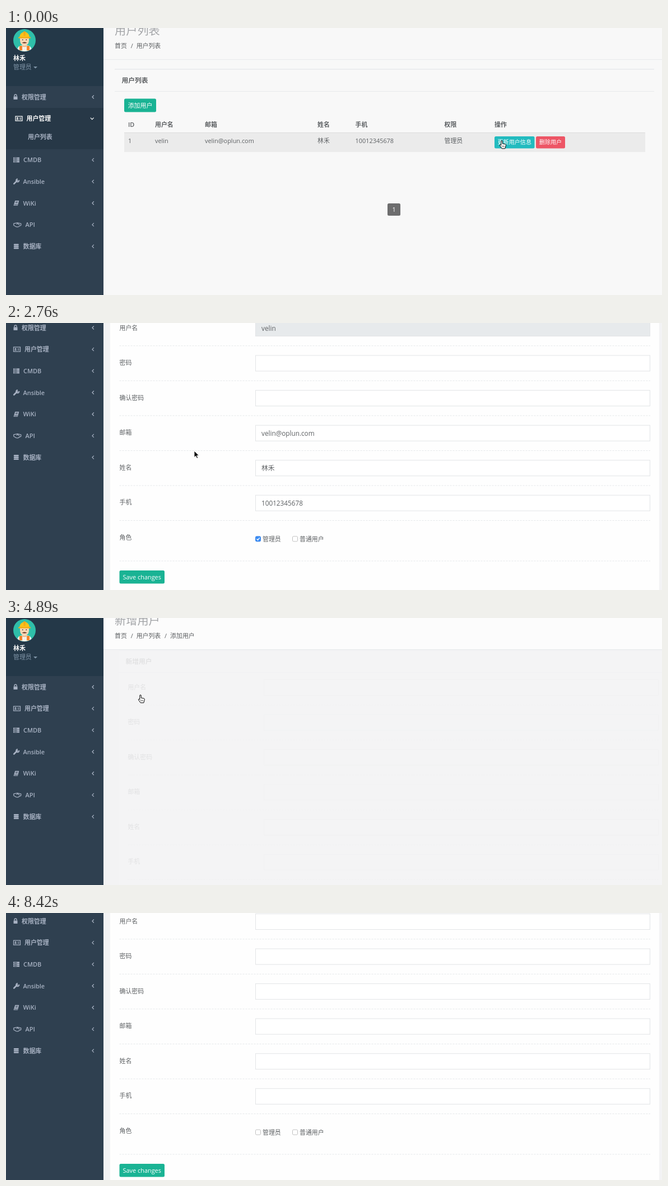
An HTML page that plays this animation: 1171 px wide and 478 px high, repeating every 9.26 s.

```html
<!DOCTYPE html>
<html lang="zh-CN">
<head>
<meta charset="utf-8">
<title>用户列表</title>
<style>
html, body { margin: 0; width: 100%; height: 100%; overflow: hidden; background: #f3f3f4; }
svg { display: block; width: 1171px; height: 478px; }
text { font-family: "Open Sans", "Noto Sans CJK SC", "Noto Sans CJK", sans-serif; white-space: pre; }
</style>
</head>
<body>
<svg id="stage" viewBox="0 0 1171 478" xmlns="http://www.w3.org/2000/svg"></svg>
<script>
const LOOP = 9260;
const USER = 'velin', MAIL = 'velin@oplun.com', PHONE = '10012345678', NAME = '林禾';
const INK = '#5d6063', LINE = '#e7eaec', TEAL = '#1ab394', GREY = '#a7b1c2', BED = '#2f4050';
const EM = 10.92, BIG = 11.76, SMALL = 10.08;

// ---------- drawing helpers ----------
const rect = (x, y, w, h, fill, more = '') =>
  `<rect x="${x}" y="${y}" width="${w}" height="${h}" fill="${fill}" ${more}/>`;
const circle = (x, y, r, fill) => `<circle cx="${x}" cy="${y}" r="${r}" fill="${fill}"/>`;
const area = (d, fill) => `<path d="${d}" fill="${fill}"/>`;
const line = (d, color, width = 1, more = '') =>
  `<path d="${d}" fill="none" stroke="${color}" stroke-width="${width}" ${more}/>`;
const group = (content, more = '') => `<g ${more}>${content}</g>`;
const at = (x, y) => `transform="translate(${x} ${y})"`;
const times = (n, f) => Array.from({ length: n }, (_, i) => f(i)).join('');
// y is the optical middle of the line
const text = (x, y, s, { size = EM, fill = INK, weight = 400, anchor = 'start' } = {}) =>
  `<text x="${x}" y="${y + size * 0.37}" font-size="${size}" fill="${fill}" font-weight="${weight}" text-anchor="${anchor}">${s}</text>`;
const button = (x, y, w, h, fill, label, size = EM, more = '') =>
  rect(x, y, w, h, fill, `rx="2.5" ${more}`) +
  text(x + w / 2, y + h / 2, label, { size, fill: '#fff', weight: 500, anchor: 'middle' });

// ---------- sidebar ----------
const icons = {
  lock: () => rect(-3.5, -1, 7, 5.5, GREY) + line('M-2 -1v-1.5a2 2 0 0 1 4 0V-1', GREY, 1.4),
  card: c => line('M-6 -4h12v8h-12z', c, 1.2) + circle(-2.5, -1, 1.4, c) + rect(-4.2, .6, 3.4, 1.6, c) +
    times(2, i => rect(1, -1.6 + 2.2 * i, 3.4, 1, c)),
  server: () => times(3, i => rect(-5.5, -4.5 + 3.2 * i, 11, 2.6, GREY) + rect(-4, -3.7 + 3.2 * i, 5, 1, BED)),
  wrench: () => line('M-4 4L2 -2', GREY, 2.6, 'stroke-linecap="round"') + line('M5 -2.5a2.6 2.6 0 1 1 -2.5 -2', GREY, 2),
  book: () => area('M-2 -4.5h7l-2.4 9h-7.4z', GREY) + times(2, i => rect(-1 - i / 2, -2.8 + 1.8 * i, 3.8, .9, BED)) +
    rect(-3.5, 2.4, 6, .9, BED),
  hands: () => line('M-6.5 -2l4.500 -1 2 -.5 6.500 1.500v3l-5.500 3 -3 -.3 -4.500 -2.700z', GREY, 1.2) + line('M-1.500 -.5l2 -2 3.500 3', GREY, 1.2),
  data: () => times(3, i => rect(-4.5, -4.5 + 3.2 * i, 9, 2.6, GREY, 'rx="1.2"'))
};
// icon, icon width, label
const menu = [['lock', 8, '权限管理'], ['card', 13, '用户管理'], ['server', 11, 'CMDB'], ['wrench', 10.5, 'Ansible'],
  ['book', 10.5, 'WiKi'], ['hands', 14.5, 'API'], ['data', 10.5, '数据库']];

const avatar = () => group(
  circle(0, 0, 20, '#2fbfa9') +
  area('M-12.5 15.6Q-11 9 -4 9h8q7 0 8.5 6.6A20 20 0 0 1 -12.5 15.6z', '#f4f1ea') +
  times(2, i => rect(-9 + 13 * i, 10, 5, 8, '#f0842c')) +
  rect(-3.5, 6, 7, 6, '#eebd94') +
  area('M-8 -5h16v6q-1 8 -8 9 -7 -1 -8 -9z', '#fad7b4') +
  area('M-4.5 4.600q4.500 -3 9 0 -4.500 1.800 -9 0z', '#6b3f2c') +
  times(2, i => circle(-3.3 + 6.6 * i, -.8, .9, '#333')) +
  area('M-9 -5a9 10 0 0 1 18 0z', '#fcc21b') +
  rect(-1.7, -16, 3.4, 8, '#f5a81c') +
  rect(-11, -6, 22, 2.6, '#f3ab19', 'rx="1.3"'), at(33, 22));

function sidebar(open) {
  let s = rect(0, -60, 174, 164, '#243848') + avatar() +
    text(13, 53.5, NAME, { fill: '#fff', weight: 700 }) +
    text(13, 69.5, '管理员', { fill: '#8095a8' }) + area('M49 69h7l-3.5 3.5z', '#8095a8');
  if (open) s += rect(0, 143, 174, 74, '#273847') + text(39, 195, '用户列表', { fill: GREY, weight: 600 });
  menu.forEach(([icon, w, label], i) => {
    const on = open && i === 1, c = on ? '#fff' : GREY, x = on ? 16.5 : 13;
    const y = 123.5 + 38.68 * i + (open && i > 1 ? 35.3 : 0);
    s += group(icons[icon](c), at(x + w / 2, y)) + text(x + w + 7, y, label, { fill: c, weight: 600 }) +
      line(on ? `M150.8 ${y - 1.5}l2.9 3 2.9 -3` : `M156.8 ${y - 3}l-2.9 3 2.9 3`, c, 1.2);
  });
  return s;
}

// ---------- pages ----------
function heading(title, crumbs) {
  let x = 194, s = text(x, 4.5, title, { size: 20.2, weight: 100, fill: '#a3a5a8' });
  crumbs.forEach((c, i) => {
    if (i) s += text(x - 8, 31.5, '/', { anchor: 'middle' });
    s += text(x, 31.5, c);
    x += c.length * EM + 16.8;
  });
  return s;
}

const panelHead = (x, y, w, title) => rect(x, y, w, 1.5, LINE) +
  text(x + 12.5, y + 21, title, { size: BIG, weight: 600 }) + rect(x, y + 40, w, 1, LINE);

function list() {
  const cols = [218, 266, 355, 556, 623.5, 782.5, 872];
  const heads = ['ID', '用户名', '邮箱', '姓名', '手机', '权限', '操作'];
  const row = ['1', USER, MAIL, NAME, PHONE, '管理员'];
  return rect(150, 56, 1040, 600, '#f8f8f8') + panelHead(194, 73, 963, '用户列表') +
    button(211, 126.5, 57, 24, TEAL, '添加用户') +
    heads.map((h, i) => text(cols[i], 173, h, { weight: 600 })).join('') +
    rect(211, 187.5, 930, 34.5, '#f5f5f5', 'id="row"') + rect(211, 187, 930, 1, '#dcdcdc') +
    row.map((v, i) => text(cols[i], 202, v)).join('') +
    button(872, 194, 71.5, 21.5, '#23c6c8', '更新用户信息', SMALL, 'id="edit"') +
    button(946, 194, 52, 21.5, '#ed5565', '删除用户', SMALL) +
    button(681, 314, 23, 22, '#6d6d6e', '1');
}

const checkbox = (x, y, label, on) =>
  rect(x + .5, y - 4.5, 9, 9, on ? '#3b8df5' : '#fff', `rx="1.8" stroke="${on ? '#3580e6' : '#b9b9b9'}" stroke-width=".9"`) +
  (on ? line(`M${x + 2.6} ${y}l1.9 2.2 3.2 -4.4`, '#fff', 1.4) : '') + text(x + 13, y, label);

function form(title, values) {
  const labels = ['用户名', '密码', '确认密码', '邮箱', '姓名', '手机', '角色'];
  const dash = y => line(`M202.5 ${y}H1150`, '#e4e7e9', 1, 'stroke-dasharray="3 2"');
  let s = rect(186, 57, 980, 700, '#fefefe') + panelHead(186, 57, 980, title);
  labels.forEach((label, i) => {
    const y = 110.5 + 62.55 * i;
    s += text(202.5, y + 13, label);
    if (i < 6) s += rect(445.5, y, 704, 28, values && !i ? '#e7eaec' : '#fff', 'stroke="#e2e4e6"') +
      text(456, y + 14, values ? values[i] : '', { size: BIG }) + dash(y + 45.3);
  });
  return s + checkbox(445, 501.5, '管理员', !!values) + checkbox(511, 501.5, '普通用户', false) +
    dash(541) + button(202.5, 558, 80.5, 23.5, TEAL, 'Save changes');
}

const pointers = {
  arrow: `<path d="M0 0v11.500l2.700 -2.500 2 4.300 2 -.9 -2 -4.100h3.700z" stroke="#fff" stroke-width=".9"/>`,
  beam: line('M-2.500 -6q2.500 0 2.500 1.500v9q0 1.500 2.500 1.500M2.500 -6q-2.500 0 -2.500 1.500v9q0 1.500 -2.500 1.500M-1.500 1h3', '#222'),
  hand: `<path d="M-1.200 1q0 -1.300 1.200 -1.300t1.200 1.300v4l5 1q1.300 .4 1.200 1.800l-1.600 6h-5.600l-3.500 -5q-.9 -1.600 .6 -1.800l1.500 1z" fill="#fff" stroke="#000"/>` +
    times(3, i => rect(.2 + 1.8 * i, 8.5, .6, 2.6, '#000'))
};

const views = {
  list: [list(), heading('用户列表', ['首页', '用户列表'])],
  update: [form('更新用户信息', [USER, '', '', MAIL, NAME, PHONE]), heading('更新用户', ['首页', '用户列表', '更新用户'])],
  add: [form('新增用户'), heading('新增用户', ['首页', '用户列表', '添加用户'])]
};
const names = Object.keys(views);

const stage = document.getElementById('stage');
stage.innerHTML =
  rect(174, 0, 997, 478, '#f3f3f4') +
  group(
    names.map(n => group(views[n][0], `id="${n}"`)).join('') +
    rect(174, -60, 997, 116, '#fcfcfc', 'id="top"') + rect(174, 56, 997, 1, LINE) +
    names.map(n => group(views[n][1], `id="${n}Head"`)).join(''), 'id="page"') +
  rect(0, 0, 174, 478, BED) +
  group(group(sidebar(false), 'id="shut"') + group(sidebar(true), 'id="open"'), 'id="side"') +
  Object.keys(pointers).map(k => group(pointers[k], `id="${k}"`)).join('');

const el = {};
stage.querySelectorAll('[id]').forEach(n => el[n.id] = n);
const show = (id, on) => el[id].setAttribute('display', on ? 'inline' : 'none');
const fill = (id, c) => el[id].setAttribute('fill', c);
const move = (id, x, y) => el[id].setAttribute('transform', `translate(${x.toFixed(2)} ${y.toFixed(2)})`);

// ---------- motion ----------
const CLICK = 470, BOTTOM = -109;
const visits = [[-2000, 'list'], [CLICK, 'update'], [3905, 'list'], [4780, 'add']];
// start, resting place, overshoot
const flicks = [[0, 0, 0], [1240, BOTTOM, -10], [1900, 0, 5], [2460, BOTTOM, -6], [2950, 0, 5],
  [5510, BOTTOM, -6], [6280, 0, 5], [7100, BOTTOM, -6]];
// start, place, pointer
const glides = [[-2000, 885, 202, 'hand'], [600, 570, 258, 'beam'], [2160, 336, 229, 'arrow'], [2850, 256, 31, 'hand'],
  [3400, 288.5, 48, 'arrow'], [4100, 240, 138, 'hand'], [4900, 470, 189, 'beam'], [7400, 1095, 445, 'arrow'], [8000, 1112, 486, 'arrow']];

const clamp = u => Math.min(1, Math.max(0, u));
const smooth = u => u * u * (3 - 2 * u);
const mix = (a, b, u) => a + (b - a) * u;
const current = (steps, t) => steps.reduce((n, s, i) => s[0] <= t ? i : n, 0);

// a flick runs past its end, then springs back
function scroll(t) {
  const i = current(flicks, t), [start, rest, over] = flicks[i];
  const from = i ? flicks[i - 1][1] : 0, u = clamp((t - start) / 300);
  return mix(from, rest, smooth(u)) + over * u ** 3 * Math.exp(-Math.max(0, t - start - 300) / 150);
}

function pointer(t) {
  const i = current(glides, t), to = glides[i], from = glides[Math.max(0, i - 1)];
  const u = smooth(clamp((t - to[0]) / 550));
  return { x: mix(from[1], to[1], u), y: mix(from[2], to[2], u), kind: (u > .5 ? to : from)[3] };
}

// panels fade in from the right with the CSS "ease" curve
function ease(x) {
  let lo = 0, hi = 1;
  for (let i = 0; i < 20; i++) {
    const u = (lo + hi) / 2;
    if (.75 * u * (1 - u) + u ** 3 < x) lo = u; else hi = u;
  }
  return .3 * lo * (1 - lo) ** 2 + 3 * lo * lo * (1 - lo) + lo ** 3;
}

function draw(t) {
  const [since, name] = visits[current(visits, t)];
  const p = ease(clamp((t - since) / 1000)), y = scroll(t), mouse = pointer(t);
  const isList = name === 'list', open = isList && t - since > 250;

  for (const n of names) {
    show(n, n === name);
    show(n + 'Head', n === name);
  }
  move(name, 16.8 * (1 - p), 0);
  el[name].setAttribute('opacity', p.toFixed(3));
  move('page', 0, y);
  move('side', 0, y);
  show('open', open);
  show('shut', !open);

  const hover = isList && mouse.y > 187;
  fill('top', isList ? '#f8f8f8' : '#fcfcfc');
  fill('row', hover ? '#ebebeb' : '#f5f5f5');
  fill('edit', !hover ? '#23c6c8' : t < 150 ? '#22bbbf' : '#1fb0b3');

  for (const k in pointers) show(k, k === mouse.kind);
  move(mouse.kind, mouse.x, mouse.y);
}

let begin = null;
function loop(now) {
  if (begin === null) begin = now;
  draw((now - begin) % LOOP);
  requestAnimationFrame(loop);
}
draw(0);
requestAnimationFrame(loop);
</script>
</body>
</html>
```
